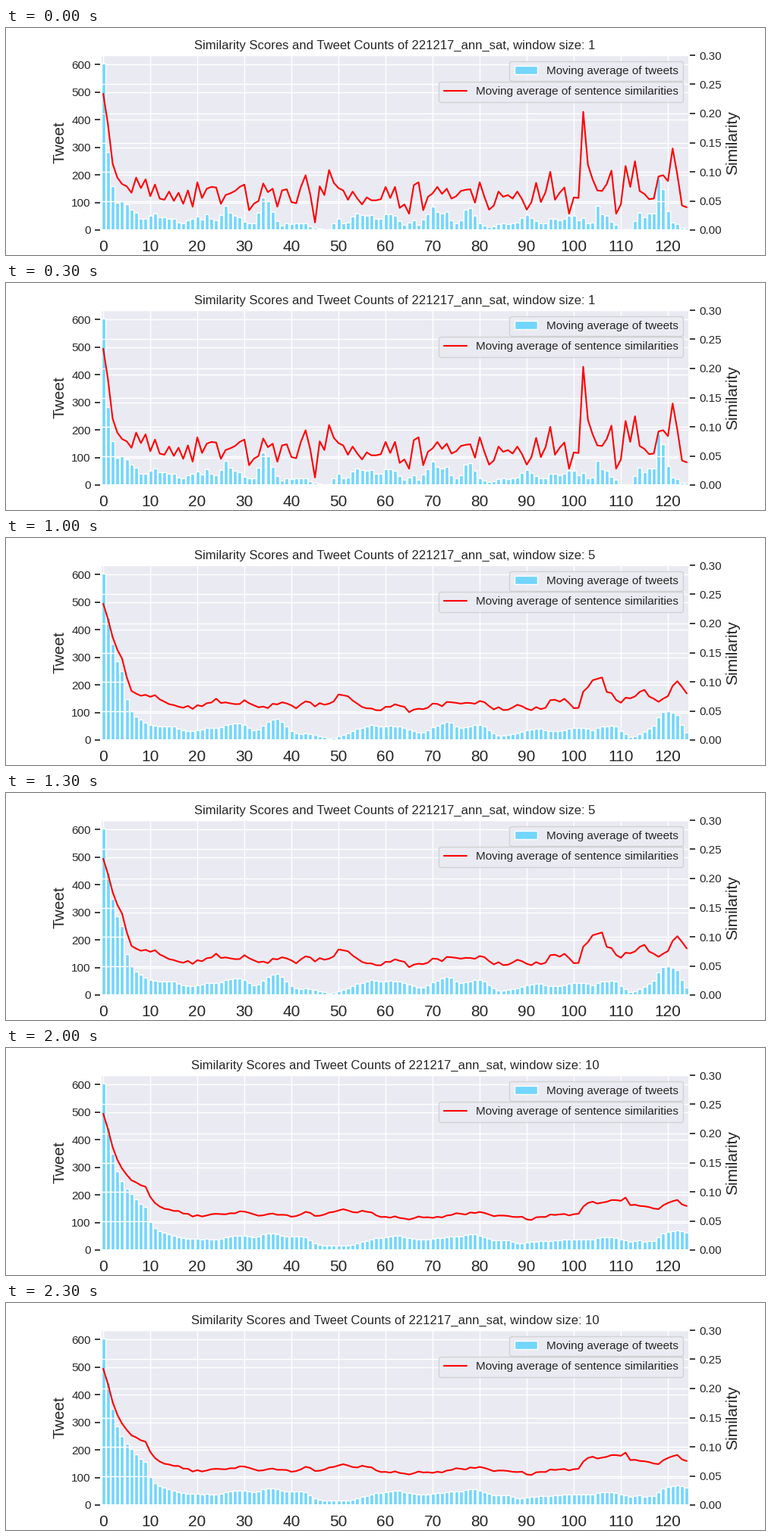
Write a matplotlib script that moves like this. It is 1000 px wide and 300 px high and loops after 2.5 s.

```python
import matplotlib.pyplot as plt
import numpy as np
from matplotlib.animation import FuncAnimation
from matplotlib.ticker import MultipleLocator

INK = ".15"
BAR_COLOR = "#72d6fe"
WINDOWS = [1, 3, 5, 7, 10]

# Raw readings per time step; every view is a trailing mean of these.
tweets = np.array([
    604, 283, 158, 98, 103, 93, 75, 63, 42, 42,
    53, 61, 48, 48, 42, 42, 28, 24, 35, 40,
    50, 38, 58, 40, 35, 56, 88, 64, 53, 47,
    29, 26, 26, 63, 118, 103, 65, 33, 17, 24,
    23, 26, 24, 24, 14, 7, 6, 2, 2, 25,
    40, 24, 27, 50, 60, 55, 52, 56, 42, 42,
    57, 58, 53, 33, 18, 27, 35, 20, 38, 57,
    86, 65, 60, 65, 35, 25, 35, 75, 80, 53,
    25, 17, 10, 14, 22, 26, 23, 26, 28, 44,
    54, 44, 32, 26, 25, 40, 40, 36, 40, 53,
    53, 35, 44, 24, 28, 88, 57, 53, 30, 20,
    3, 2, 4, 33, 63, 48, 60, 60, 187, 147,
    68, 28, 22, 9, 9])
similarity = np.array([
    234, 182, 114, 90, 79, 75, 64, 90, 72, 87,
    58, 78, 54, 52, 66, 50, 64, 45, 68, 40,
    82, 55, 71, 74, 73, 45, 60, 63, 67, 74,
    78, 34, 45, 50, 80, 65, 71, 40, 68, 70,
    48, 46, 74, 94, 61, 13, 75, 60, 103, 81,
    72, 68, 52, 66, 54, 44, 56, 51, 51, 53,
    74, 55, 74, 38, 44, 28, 77, 82, 34, 57,
    63, 74, 62, 71, 54, 58, 67, 69, 70, 47,
    82, 57, 35, 42, 66, 57, 60, 54, 66, 53,
    35, 48, 81, 48, 65, 100, 52, 64, 73, 28,
    56, 55, 203, 112, 87, 68, 67, 79, 102, 28,
    44, 110, 74, 118, 67, 62, 53, 54, 92, 94,
    84, 140, 95, 42, 39]) / 1000

plt.rcParams.update({
    "font.family": "Liberation Sans",
    "font.size": 12,
    "text.color": INK,
    "axes.facecolor": "#EAEAF2",
    "axes.edgecolor": "white",
    "axes.labelcolor": INK,
    "axes.labelsize": 15,
    "axes.titlesize": 12,
    "axes.linewidth": 1.25,
    "axes.axisbelow": True,
    "axes.grid": True,
    "grid.color": "white",
    "grid.linewidth": 1,
    "xtick.bottom": False,
    "xtick.color": INK,
    "ytick.color": INK,
    "xtick.labelsize": 15,
    "ytick.labelsize": 11,
    "xtick.major.size": 6,
    "ytick.major.size": 6,
    "xtick.major.width": 1.25,
    "ytick.major.width": 1.25,
    "legend.fontsize": 11,
})


def trailing_mean(values, window):
    return np.array([values[max(0, i - window + 1):i + 1].mean()
                     for i in range(len(values))])


fig, count_ax = plt.subplots(figsize=(10, 3), dpi=100)
score_ax = count_ax.twinx()
steps = np.arange(len(tweets))

bars = count_ax.bar(steps, tweets, width=0.8, color=BAR_COLOR,
                    edgecolor="white", linewidth=1,
                    label="Moving average of tweets")
line, = score_ax.plot(steps, similarity, color="red", linewidth=1.5,
                      solid_capstyle="round",
                      label="Moving average of sentence similarities")

count_ax.set(xlim=(-0.5, len(steps) - 0.5), ylim=(0, tweets.max() * 1.05),
             ylabel="Tweet")
count_ax.xaxis.set_major_locator(MultipleLocator(10))
count_ax.yaxis.set_major_locator(MultipleLocator(100))
score_ax.set(ylim=(0, 0.3), ylabel="Similarity")
score_ax.yaxis.set_major_locator(MultipleLocator(0.05))
count_ax.legend(loc="upper right")
score_ax.legend(loc="upper right", bbox_to_anchor=(1, 0.88))
title = count_ax.set_title("")


def update(frame):
    window = WINDOWS[frame]
    for bar, height in zip(bars, trailing_mean(tweets, window)):
        bar.set_height(height)
    line.set_ydata(trailing_mean(similarity, window))
    title.set_text("Similarity Scores and Tweet Counts of 221217_ann_sat, "
                   f"window size: {window}")
    return [*bars, line, title]


anim = FuncAnimation(fig, update, frames=len(WINDOWS), interval=500,
                     repeat=True, repeat_delay=0)
plt.show()
```
